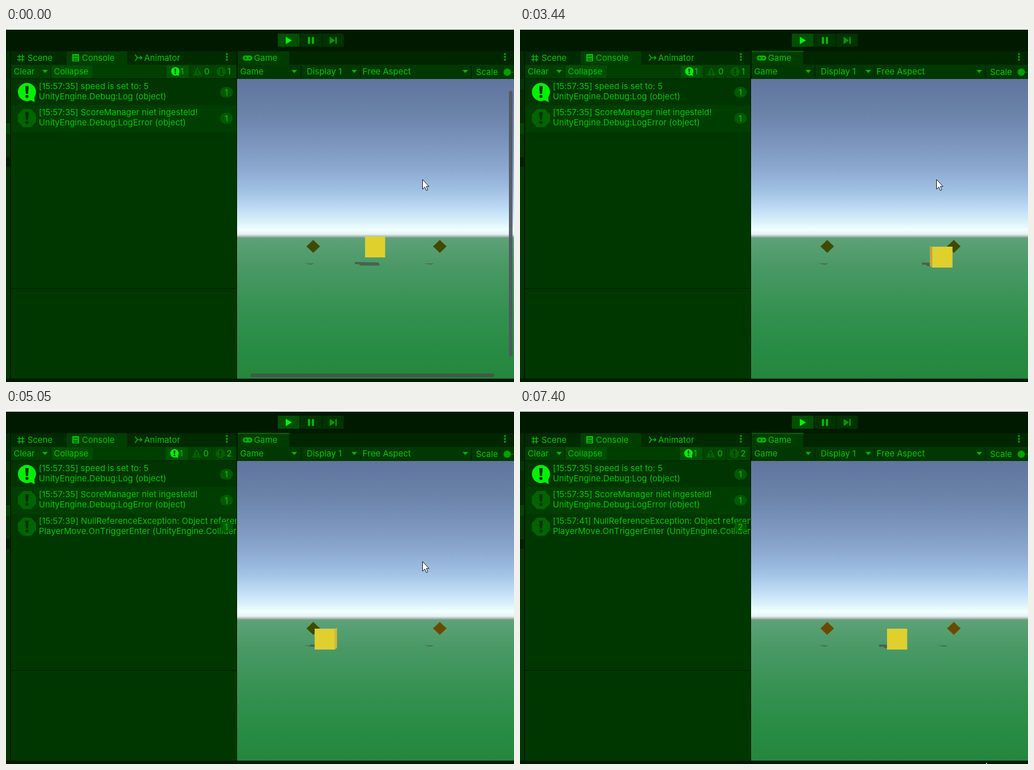
An HTML page for the animation above (7.91 s loop, 897 px wide and 625 px high).

```html
<!DOCTYPE html>
<html lang="nl">
<head>
<meta charset="utf-8">
<title>Console en Game</title>
<style>
  html, body { margin: 0; width: 100%; height: 100%; overflow: hidden; background: #001a00; }
  svg { display: block; width: 897px; height: 625px; }
  text {
    font: 14.9px Inter, "Open Sans", sans-serif; fill: #00c800; white-space: pre;
    font-kerning: none; font-variant-ligatures: none;
  }
</style>
</head>
<body>
<svg id="stage" viewBox="0 0 897 625"></svg>
<script>
const LOOP = 7910;
const rect = (x, y, w, h, fill, more = '') =>
  `<rect x="${x}" y="${y}" width="${w}" height="${h}" fill="${fill}" ${more}/>`;
const poly = (points, fill, more = '') => `<polygon points="${points}" fill="${fill}" ${more}/>`;
const path = (d, fill, more = '') => `<path d="${d}" fill="${fill}" ${more}/>`;
const text = (x, y, s, more = '') => `<text x="${x}" y="${y}" ${more}>${s}</text>`;
const circle = (x, y, r, fill, more = '') => `<circle cx="${x}" cy="${y}" r="${r}" fill="${fill}" ${more}/>`;
const group = (id, body, more = '') => `<g id="${id}" ${more}>${body}</g>`;
const arrow = x => poly(`${x - 5},74 ${x + 5},74 ${x},79.500`, '#00b400');
const dots = x => [46, 51, 56].map(y => rect(x - 1.5, y - 1.5, 3, 3, '#00b400')).join('');
const gradient = (id, y1, y2, stops) =>
  `<linearGradient id="${id}" gradientUnits="userSpaceOnUse" x1="0" x2="0" y1="${y1}" y2="${y2}">` +
  stops.map(([y, c]) => `<stop offset="${(y - y1) / (y2 - y1)}" stop-color="${c}"/>`).join('') +
  '</linearGradient>';

// Message icons, centred on x, y with radius r
const mark = (x, y, r, fill) =>
  poly(`${x - r * .19},${y - r * .65} ${x + r * .19},${y - r * .65} ${x + r * .12},${y + r * .2} ${x - r * .12},${y + r * .2}`, fill) +
  circle(x, y + r * .49, r * .17, fill);
const bubble = (x, y, r) =>
  circle(x, y, r, '#00f000') +
  poly(`${x + r * .2},${y + r * .8} ${x + r * .8},${y + r * .3} ${x + r * .85},${y + r * 1.12}`, '#00f000') +
  mark(x, y, r, '#003000');
const octagon = (x, y, r, fill) => {
  const points = [...Array(8)].map((_, i) => {
    const a = (i + .5) * Math.PI / 4;
    return `${(x + r * 1.08 * Math.cos(a)).toFixed(1)},${(y + r * 1.08 * Math.sin(a)).toFixed(1)}`;
  });
  return poly(points.join(' '), fill) + mark(x, y, r, '#003000');
};
const badge = (y, id = '') =>
  rect(378, y - 9, 22.5, 19, '#005c00', 'rx="9.500" opacity=".9"') +
  text(389, y + 6, '1', `text-anchor="middle" ${id}`);
const message = (y, icon, first, second, ids = ['', '']) =>
  icon + text(58, y - 5, first, ids[0]) + text(58, y + 13, second) + badge(y, ids[1]);

const topBar =
  rect(0, 0, 897, 625, '#001a00') + rect(0, 0, 897, 3, '#eaf8ea') +
  rect(480, 10, 38.5, 23, '#005000') + rect(520, 10, 38, 23, '#003200') + rect(559, 10, 37.5, 23, '#003200') +
  poly('494,15.500 505,22 494,28.500', '#00f500') +
  rect(533, 16, 4, 12, '#00b400') + rect(540, 16, 4, 12, '#00b400') +
  poly('571.500,15.500 581,22 571.500,28.500', '#009800') + rect(581.5, 16, 2.5, 12, '#009800');

const toggles =
  rect(284, 66, 39, 22, '#005400') + rect(325, 66, 39.5, 22, '#004400') + rect(366, 66, 39, 22, '#004400') +
  bubble(299, 76.5, 7.5) + text(308, 82, '1') +
  poly('338,69 346,84 330,84', '#006400') + mark(338, 78, 6, '#003000') + text(350, 82, '0') +
  octagon(380, 77, 8, '#006000') + text(391, 82, '1', 'id="errors"');

const consolePanel =
  rect(0, 41, 407, 578, '#002a00') +
  rect(0, 90, 7, 529, '#003600') + rect(0, 108, 7, 60, '#002c00') + rect(0, 168, 7, 19, '#004600') + rect(0, 228, 7, 17, '#002100') +
  rect(7, 41, 2, 578, '#001a00') + rect(107, 41, 107, 24, '#003e00', 'rx="2"') +
  rect(9, 65, 398, 24, '#003e00') + rect(9, 89, 398, 1, '#002100') + rect(9, 90, 398, 529, '#003700') +
  rect(9, 90, 398, 46, '#003400') + rect(9, 136, 398, 48, '#003d00') + rect(9, 459, 398, 1.3, '#002000') +
  path('M23.500 47V59.500M29 47V59.500M20 50.500H32.500M20 56H32.500', 'none', 'stroke="#00b400" stroke-width="1.6"') +
  text(38, 58, 'Scene') +
  rect(117, 46, 12, 13, '#00c000', 'rx="1"') +
  [49, 53, 56].map(y => rect(119, y, 8, 1.3, '#003c00')).join('') + text(134, 58, 'Console') +
  path('M228 47L232 52.500H240M228 58L232 52.500M237 49.500L240 52.500L237 55.500', 'none', 'stroke="#00b400" stroke-width="1.7"') +
  text(244, 58, 'Animator') + dots(390) +
  text(13.5, 82, 'Clear') + arrow(69) + rect(79, 66, 1, 23, '#002600') +
  rect(80, 66, 73, 22, '#004c00') + text(84.5, 82, 'Collapse') +
  group('toggles', toggles) +
  message(113, bubble(37, 113, 16), '[15:57:35] speed is set to: 5', 'UnityEngine.Debug:Log (object)') +
  message(159, octagon(37, 159, 16, '#006400'), '[15:57:35] ScoreManager niet ingesteld!', 'UnityEngine.Debug:LogError (object)') +
  group('exception', message(206, octagon(37, 206, 16, '#006400'),
    '[15:57:<tspan id="second">39</tspan>] NullReferenceException: Object reference not set',
    'PlayerMove.OnTriggerEnter (UnityEngine.Collider other)', ['', 'id="hits"']));

const gameTabs =
  rect(407, 41, 2, 584, '#001800') + rect(409, 41, 488, 24, '#002600') + rect(409, 41, 91, 24, '#003c00') +
  rect(409, 40.5, 92, 1.8, '#006c00', 'id="focus"') +
  rect(409, 65, 488, 25, '#003800') +
  [520, 625, 821].map(x => rect(x, 66, 1.5, 23, '#002400')).join('') +
  rect(418, 48.5, 17, 9, '#00b400', 'rx="4.500"') + circle(430, 53, 1.6, '#003a00') +
  path('M420.500 53H425.500M423 50.500V55.500', 'none', 'stroke="#003a00" stroke-width="1.3"') +
  text(438, 58, 'Game') + dots(881) +
  text(413.5, 82, 'Game') + arrow(509) + text(531, 82, 'Display 1') + arrow(615) +
  text(629.5, 82, 'Free Aspect') + arrow(811) + text(830, 83, 'Scale') +
  rect(885, 77, 12, 2, '#006000') + circle(885, 78, 6.5, '#00a000');

const diamond = (x, id) =>
  poly(`${x},373 ${x + 5},378.500 ${x - 5},378.500`, '#6f7f62') +
  poly(`${x},374.500 ${x + 12},385.500 ${x},397 ${x - 12},385.500`, '#3e4b00', `id="${id}"`);
const flatShadow = x => poly(`${x},415.500 ${x + 17},415.500 ${x + 17},416.800 ${x + 11},418 ${x + 7},416.800`, '#4a6a55');
const gameView =
  rect(408, 90, 489, 280, 'url(#sky)') + rect(408, 370, 489, 249, 'url(#ground)') +
  flatShadow(526) + flatShadow(737) +
  poly('0,413 42,414 44,419.500 10,419.500 7,417 0,417', '#48634f', 'id="shadow"') +
  diamond(542.5, 'left') + diamond(766, 'right') +
  poly('', '#c6a534', 'id="nearSide"') + poly('', '#cfb83a', 'id="farSide"') +
  rect(0, 0, 35.5, 37, '#dfd02e', 'id="face"') +
  rect(0, 0, 34.5, 36, 'none', 'id="edge" stroke="#d9c650"') +
  group('bars', rect(888, 111, 6.5, 469, '#505860', 'rx="3"') + rect(432, 610, 430, 6.5, '#42564a', 'rx="3"'), 'opacity=".92"');

const pointer =
  circle(735, 267.5, 14.5, '#ffff00', 'id="click" opacity=".47"') +
  path('M.5 .5V17.500L4.500 13.800L7.200 20L9.800 18.800L7.200 12.800H12Z', '#fff', 'id="cursor" stroke="#111" stroke-width="1"');

const stage = document.getElementById('stage');
stage.innerHTML = '<defs>' +
  gradient('sky', 90, 370, [[90, '#5f759d'], [150, '#6b82a9'], [200, '#7a94bb'], [250, '#8da9d0'], [285, '#9fbfe3'],
    [320, '#bfddf4'], [343, '#dbf2fb'], [356, '#f1ffff'], [364, '#e6f3f4'], [367, '#bccbc9'], [370, '#819e8c']]) +
  gradient('ground', 370, 619, [[370, '#66a07c'], [374, '#5ca176'], [420, '#4a9965'], [500, '#349150'], [560, '#298c45'], [619, '#24873c']]) +
  '</defs>' + topBar + consolePanel + gameTabs + gameView + pointer;

const part = Object.fromEntries([...stage.querySelectorAll('[id]')].map(e => [e.id, e]));
const set = (id, attrs) => { for (const k in attrs) part[id].setAttribute(k, attrs[k]); };
const show = (id, on) => set(id, { visibility: on ? 'visible' : 'hidden' });
const label = (id, s) => { if (part[id].textContent !== s) part[id].textContent = s; };

// Start, end, number of poses, first x, last x
const moves = [
  [2890, 3660, 16, 641, 772],
  [3760, 4530, 16, 766, 634],
  [4580, 5050, 10, 626, 545],
  [5093, 5350, 6, 538, 508],
  [5400, 6170, 16, 514, 648]
];
const pose = (t, start, end, count) =>
  Math.max(0, Math.min(count - 1, Math.floor((t - start) / ((end - start) / (count - 1)) + 1e-6)));

function cubeX(t) {
  let x = 634;
  for (const [start, end, count, from, to] of moves)
    if (t >= start) x = from + (to - from) * pose(t, start, end, count) / (count - 1);
  return Math.round(x);
}

function drawCube(t) {
  const x = cubeX(t), w = 35.5, h = 37;
  const fall = t < 460 ? 0 : ((pose(t, 460, 860, 9) + 1) / 9) ** 2;
  const y = Math.round(368 + 18 * fall);
  const backX = v => 652 + (v - 652) * .943;
  const backY = v => 368 + (v - 368) * .943;
  const side = v => `${v},${y} ${backX(v)},${backY(y)} ${backX(v)},${backY(y + h)} ${v},${y + h}`;
  set('nearSide', { points: side(x), visibility: x > 652 ? 'visible' : 'hidden' });
  set('farSide', { points: side(x + w), visibility: x + w < 652 ? 'visible' : 'hidden' });
  set('face', { x, y });
  set('edge', { x: x + .5, y: y + .5, opacity: fall });
  set('shadow', { transform: `translate(${backX(x) - 19 + 5 * fall} ${fall})` });
}

function drawCursor(t) {
  const p = t < 6830 ? 0 : (pose(t, 6830, 7400, 12) + 1) / 12;
  const eased = p * p * (3 - 2 * p);
  set('cursor', { transform: `translate(${Math.round(735 + 87 * eased)} ${Math.round(267 + 354 * eased)})` });
  show('click', t >= 1810 && t < 1930);
}

function draw(t) {
  const firstHit = t >= 3454, secondHit = t >= 5093;
  show('bars', t < 150);
  show('focus', t >= 150);
  show('exception', firstHit);
  set('toggles', { transform: `translate(${firstHit ? -1.5 : 0} 0)` });
  label('errors', firstHit ? '2' : '1');
  label('hits', secondHit ? '2' : '1');
  label('second', secondHit ? '41' : '39');
  set('right', { fill: firstHit ? '#6b4a00' : '#3e4b00' });
  set('left', { fill: secondHit ? '#6b4a00' : '#3e4b00' });
  drawCube(t);
  drawCursor(t);
}

const began = performance.now();
function tick() {
  draw((performance.now() - began) % LOOP);
  requestAnimationFrame(tick);
}
tick();
</script>
</body>
</html>
```
